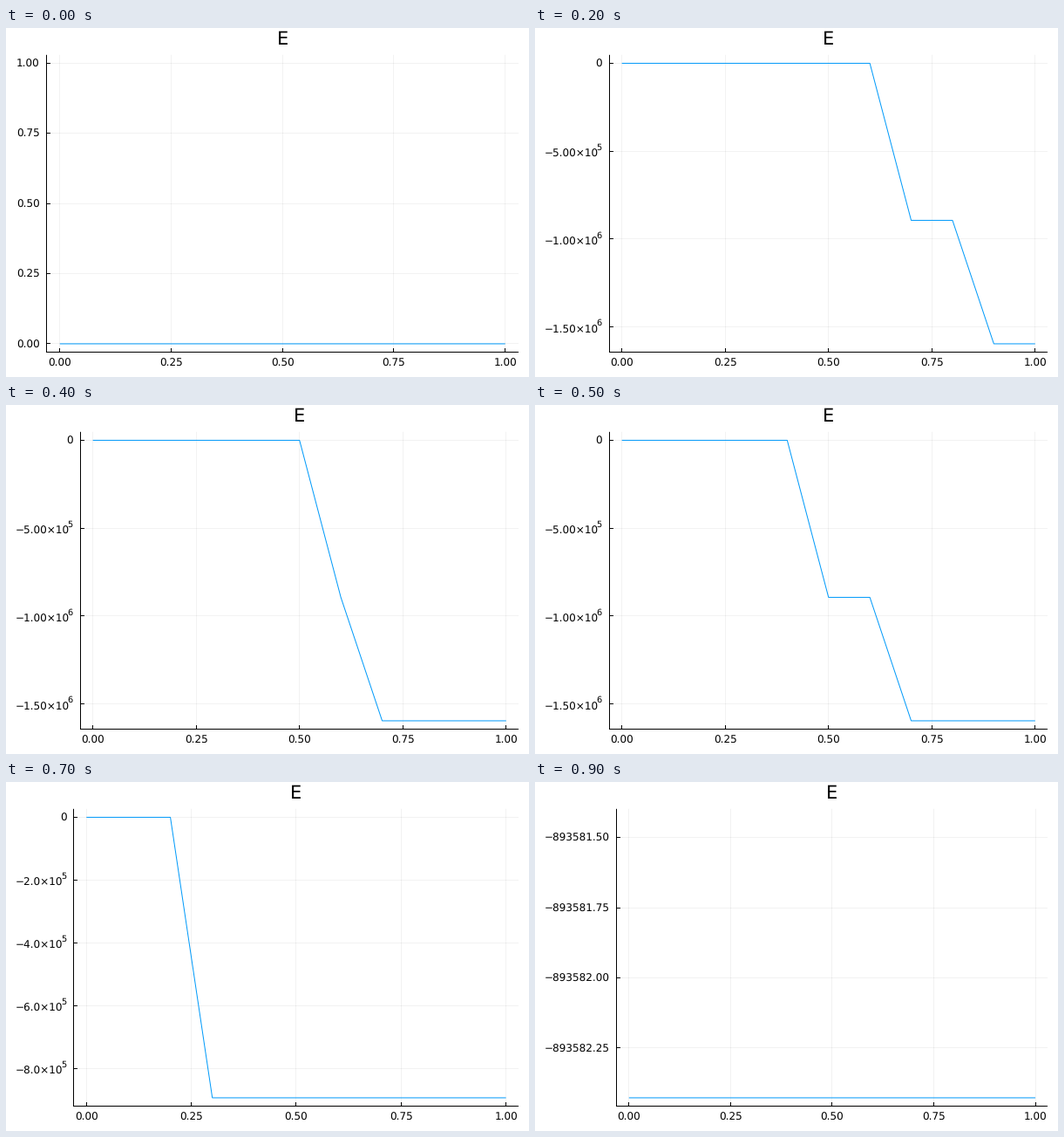
Recreate the animation shown at these times as a matplotlib script. Size 600 by 400 pixels, loop 1.1 s.

```python
import math

import matplotlib.pyplot as plt
import numpy as np
from matplotlib.animation import FuncAnimation

W, H = 600, 400
TOP, BOTTOM, RIGHT = 30.8, 371.6, 588
PAD = 0.03 / 1.06
BLUE = "#009AFA"
LOW, LOWEST, SPIKE = -893582.4275, -1.596e6, 8.655e5
GRID = np.arange(11)

# Cell holding each charge; the field drops just after it.
FIRST = [6, 6, 5, 4, 3, 2, 1, -1, -1]
SECOND = [8, 7, 6, 6, 7, 10, 10, 10, 10]

plt.rcParams.update({"font.family": "DejaVu Sans", "text.hinting": "none"})
fig = plt.figure(figsize=(W / 72, H / 72), dpi=72, facecolor="white")
ax = fig.add_axes([0, 0, 1, 1])


def field(n):
    if n == 0:
        return np.zeros(11)
    if n == 1:
        return np.where(GRID == 0, SPIKE, np.where(GRID == 10, LOW, 0.0))
    return LOW * (GRID > FIRST[n - 2]) + (LOWEST - LOW) * (GRID > SECOND[n - 2])


def layout(n):
    """Left edge of the plot, tick step, decimals, scientific labels."""
    if n == 0:
        return 46.5, 0.25, 2, False
    if n == 1:
        return 85.5, 2.5e5, 2, True
    if n <= 6:
        return 85.5, 5e5, 2, True
    if n <= 8:
        return 77.9, 2e5, 1, True
    return 93.8, 0.25, 2, False


def crisp(v):
    return math.floor(v) + 0.5


def stroke(xs, ys, color="black", width=1.0, alpha=1.0, z=2):
    line, = ax.plot(xs, ys, color=color, lw=width, alpha=alpha, zorder=z,
                    solid_capstyle="butt", solid_joinstyle="miter")
    line.set_snap(False)


def label(x, y, text, size=12, ha="right"):
    ax.text(x, y, text, fontsize=size, ha=ha, va="baseline")


def y_label(left, y, value, decimals, scientific):
    if not scientific:
        label(left - 8, y + 4.5, f"{value:.{decimals}f}".replace("-", "−"))
    elif value == 0:
        label(left - 8.4, y + 4.5, "0")
    else:
        mantissa, power = f"{value:.{decimals}e}".split("e")
        label(left - 12.5, y + 6.8, f"{mantissa}×10".replace("-", "−"))
        label(left - 8.6, y - 1.3, str(int(power)), size=9.8)


def draw(n):
    ax.clear()
    ax.set_axis_off()
    ax.set_xlim(0, W)
    ax.set_ylim(H, 0)

    left, step, decimals, scientific = layout(n)
    values = field(n)
    lo, hi = values.min(), values.max()
    if hi == lo:
        hi = lo + 1
    width, height = RIGHT - left, BOTTOM - TOP

    def px(x):
        return left + width * (PAD + x / 1.06)

    def py(y):
        return BOTTOM - height * (PAD + (y - lo) / (hi - lo) / 1.06)

    axis_x, axis_y = crisp(left), crisp(BOTTOM)
    for x in np.arange(5) / 4:
        tx = crisp(px(x))
        stroke([tx, tx], [TOP, BOTTOM], alpha=0.05, z=1)
        stroke([tx, tx], [axis_y, axis_y - 4.5])
        label(px(x), 388, f"{x:.2f}", ha="center")
    for k in range(math.ceil(lo / step), math.floor(hi / step) + 1):
        y = py(k * step)
        ty = crisp(y)
        stroke([left, RIGHT], [ty, ty], alpha=0.05, z=1)
        stroke([axis_x, axis_x + 4.5], [ty, ty])
        y_label(left, y, k * step, decimals, scientific)

    stroke([axis_x, axis_x], [TOP, axis_y + 0.5])
    stroke([axis_x - 0.5, RIGHT], [axis_y, axis_y])
    stroke(px(GRID / 10), py(values), BLUE, 1.0, z=3)
    label((left + RIGHT) / 2, 19, "E", size=21, ha="center")


anim = FuncAnimation(fig, draw, frames=11, interval=100, init_func=lambda: None,
                     repeat=True, repeat_delay=0)
plt.show()
```
